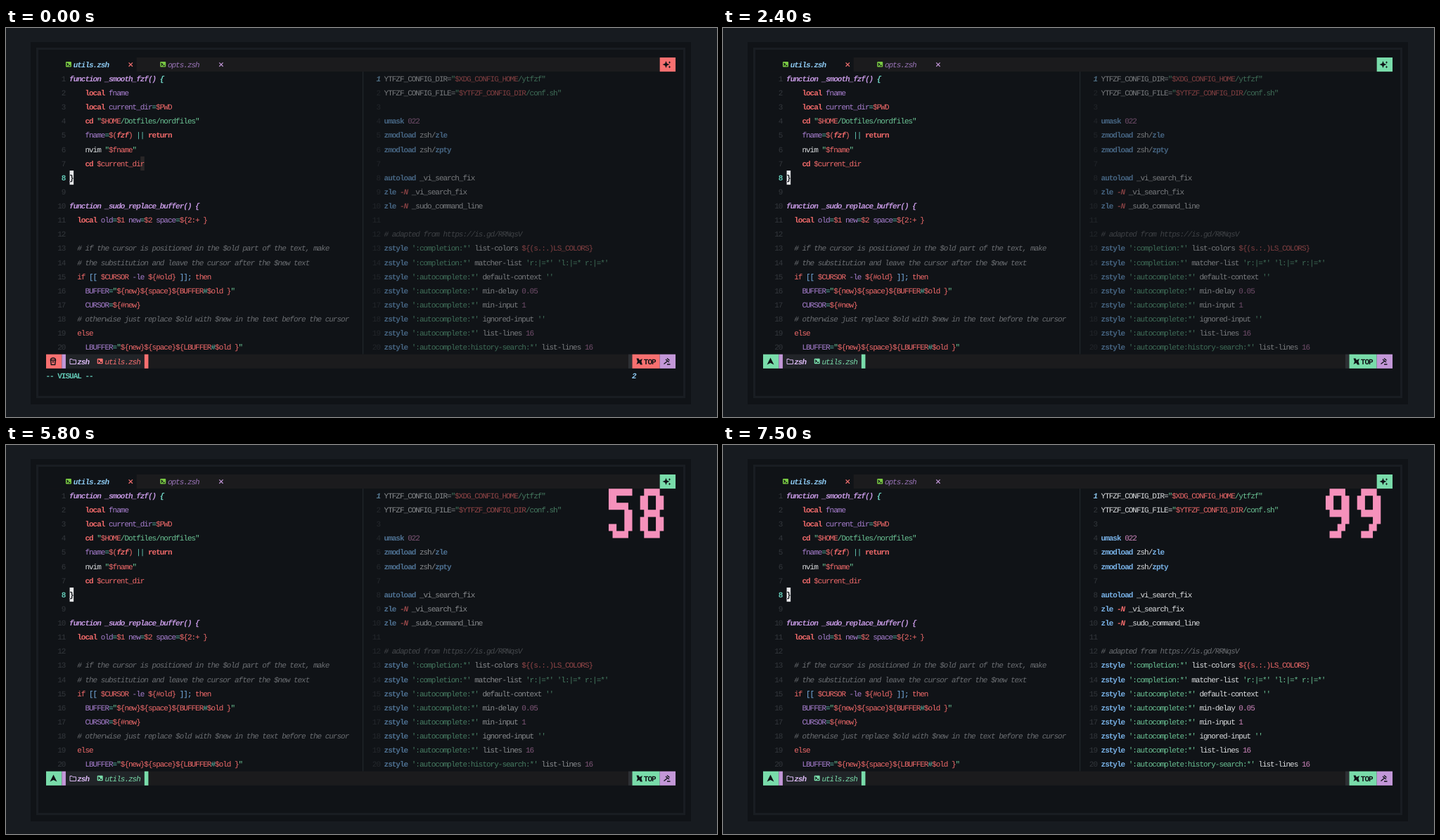
Animation, 1011 px wide and 554 px high, one loop 8 s. Source, as an HTML page:

```html
<!DOCTYPE html>
<html lang="en">
<head>
<meta charset="utf-8">
<title>Dimmed split panes</title>
<style>
html, body { margin: 0; width: 100%; height: 100%; overflow: hidden; background: #171b20; }
svg { display: block; width: 100vw; height: 100vh; --mode: #79dcaa; }
svg[data-mode=visual] { --mode: #f87070; }
text { font: 11px "Liberation Mono", "DejaVu Sans Mono", monospace; text-anchor: middle; text-rendering: geometricPrecision; }
.w { fill: #dfe1e3; }
.r, .R, .i { fill: #f06a6a; }
.m, .x { fill: #c397e0; }
.p { fill: #a87fd0; }
.t, .T { fill: #63c9b6; }
.g { fill: #6cc596; }
.c { fill: #6b6e72; }
.b, .B { fill: #7ab4ea; }
.k { fill: #cf86bd; }
.n { fill: #33373c; }
.d { fill: #101317; }
.z { fill: #d9b8f2; }
.l { fill: #8cc8f0; }
.q { fill: #9a74b8; }
.o { fill: var(--mode); }
.R, .i, .m, .x, .T, .B, .d, .z, .l { font-weight: bold; }
.i, .m, .x, .c, .z, .l, .q, .o { font-style: italic; }
[data-win=left] .x { fill: #70d5c5; }
.mode { fill: var(--mode); }
.line { fill: none; stroke: #101317; stroke-width: 1.4; }
[data-show] { display: none; }
[data-mode=visual] [data-show=visual],
[data-mode=normal] [data-show=normal],
[data-tab=left] [data-show=tab-left],
[data-tab=right] [data-show=tab-right],
[data-win=left] [data-show=file-left],
[data-win=right] [data-show=file-right],
[data-cursor=left] [data-show=cursor-left],
[data-cursor=right] [data-show=cursor-right],
[data-cursor=cmd] [data-show=cursor-cmd] { display: inline; }
</style>
</head>
<body>
<svg id="stage" viewBox="0 0 1011 554" preserveAspectRatio="none"></svg>

<script type="text/plain" id="utils">
~mfunction _smooth_fzf() ~x{
    ~Rlocal~p fname
    ~Rlocal~p current_dir~t=~r$PWD
    ~Rcd~g "~r$HOME~g/Dotfiles/nordfiles"
    ~pfname~t=~r$(~ifzf~r)~t ||~R return
    ~wnvim~g "~r$fname~g"
    ~Rcd~r $current_dir
~m}

~mfunction _sudo_replace_buffer() {
  ~Rlocal~p old~t=~r$1~p new~t=~r$2~p space~t=~r${2:+ }

  ~c# if the cursor is positioned in the $old part of the text, make
  ~c# the substitution and leave the cursor after the $new text
  ~rif~b [[~r $CURSOR~p -le~r ${#old}~b ]];~r then
    ~pBUFFER~t=~g"~r${new}${space}${BUFFER~t#~r$old }~g"
    ~pCURSOR~t=~r${#new}
  ~c# otherwise just replace $old with $new in the text before the cursor
  ~relse
    ~pLBUFFER~t=~g"~r${new}${space}${LBUFFER~t#~r$old }~g"
</script>
<script type="text/plain" id="opts">
~wYTFZF_CONFIG_DIR=~g"~r$XDG_CONFIG_HOME~g/ytfzf"
~wYTFZF_CONFIG_FILE=~g"~r$YTFZF_CONFIG_DIR~g/conf.sh"

~Bumask~k 022
~Bzmodload~w zsh/~Bzle
~Bzmodload~w zsh/~Bzpty

~Bautoload~w _vi_search_fix
~Bzle~i -N~w _vi_search_fix
~Bzle~i -N~w _sudo_command_line

~c# adapted from https://is.gd/RRNqsV
~Bzstyle~g ':completion:*'~w list-colors~r ${(s.:.)LS_COLORS}
~Bzstyle~g ':completion:*'~w matcher-list~g 'r:|=*' 'l:|=* r:|=*'
~Bzstyle~g ':autocomplete:*'~w default-context~g ''
~Bzstyle~g ':autocomplete:*'~w min-delay~k 0.05
~Bzstyle~g ':autocomplete:*'~w min-input~k 1
~Bzstyle~g ':autocomplete:*'~w ignored-input~g ''
~Bzstyle~g ':autocomplete:*'~w list-lines~k 16
~Bzstyle~g ':autocomplete:history-search:*'~w list-lines~k 16
</script>

<script>
const CELL = 5.594, ROW = 20.13, LOOP = 8000;
const colX = c => 57 + c * CELL;
const rowY = r => 42 + r * ROW;
const stage = document.getElementById("stage");

function add(parent, tag, attrs = {}) {
  const el = document.createElementNS("http://www.w3.org/2000/svg", tag);
  for (const key in attrs) el.setAttribute(key, attrs[key]);
  return parent.appendChild(el);
}
const group = (parent, show) => add(parent, "g", show ? { "data-show": show } : {});
const rect = (parent, x, y, width, height, attrs) => add(parent, "rect", { x, y, width, height, ...attrs });
const path = (parent, d, attrs) => add(parent, "path", { d, ...attrs });
const cells = (parent, from, to, row, attrs) =>
  rect(parent, colX(from), rowY(row), (to - from) * CELL, ROW, attrs);

// Every character sits in the middle of its own terminal cell.
function write(parent, col, row, style, string) {
  const xs = [...string].map((_, i) => colX(col + i + 0.5).toFixed(2));
  const el = add(parent, "text", { x: xs.join(" "), y: rowY(row) + 13.8, class: style });
  el.textContent = string.replace(/ /g, "\u00a0");
  return el;
}

function pane(sourceId, col, current, currentStyle) {
  const g = group(stage);
  const lines = document.getElementById(sourceId).textContent.slice(1).split("\n").slice(0, 20);
  lines.forEach((line, i) => {
    const label = String(i + 1);
    write(g, col - 1 - label.length, i + 1, i + 1 === current ? currentStyle : "n", label);
    const [indent, ...tokens] = line.split("~");
    let at = col + indent.length;
    for (const token of tokens) {
      write(g, at, i + 1, token[0], token.slice(1));
      at += token.length - 1;
    }
  });
  return g;
}

function terminalIcon(parent, col, row, attrs) {
  const x = colX(col), y = rowY(row) + 6;
  rect(parent, x, y, 8, 7.4, { rx: 1, ...attrs });
  path(parent, `M${x + 1.5} ${y + 2}l1.8 1.7-1.8 1.7M${x + 4.2} ${y + 5.5}h2.3`, { class: "line", "stroke-width": 1 });
}

function cursor(show, col, row, char) {
  const g = group(stage, show);
  cells(g, col, col + 1, row, { fill: "#e6e7e9" });
  if (char) write(g, col, row, "d", char);
}

// Window frame
rect(stage, 0, 0, 1011, 554, { fill: "#171b20" });
rect(stage, 35, 20, 939, 516, { fill: "#101317" });
rect(stage, 44.5, 29.5, 920, 496, { fill: "none", stroke: "#191d22", "stroke-width": 3 });

// Tab line
function tabs(active, from, to) {
  const g = group(stage, "tab-" + active);
  cells(g, 0, 156, 0, { fill: "#1b1b1d" });
  cells(g, from, to, 0, { fill: "#101317" });
  [["left", 5, "utils.zsh", 21], ["right", 29, "opts.zsh", 44]].forEach(([side, col, name, close]) => {
    const on = side === active;
    terminalIcon(g, col, 0, { fill: "#79c843" });
    write(g, col + 2, 0, on ? "l" : "q", name);
    const x = colX(close + 0.5), y = rowY(0.5);
    path(g, `M${x - 2.7} ${y - 2.7}l5.4 5.4m0-5.4l-5.4 5.4`,
      { fill: "none", stroke: on ? "#f87070" : "#c397d8", "stroke-width": 1.2 });
  });
}
tabs("left", 0, 23);
tabs("right", 24, 46);
cells(stage, 156, 160, 0, { class: "mode" });
path(stage, "M938.5 47l1.4 3.6 3.6 1.4-3.6 1.4-1.4 3.6-1.4-3.6-3.6-1.4 3.6-1.4zM943.5 47l.6 1.4 1.4.6-1.4.6-.6 1.4-.6-1.4-1.4-.6 1.4-.6zM943.5 53.5l.6 1.4 1.4.6-1.4.6-.6 1.4-.6-1.4-1.4-.6 1.4-.6z", { fill: "#101317" });

// Split panes
const selection = group(stage, "visual");
cells(selection, 24, 25, 7, { fill: "#2a2627" });
const leftPane = pane("utils", 6, 8, "T");
const rightPane = pane("opts", 86, 1, "l");
rect(stage, 507, rowY(1), 1.2, ROW * 20, { fill: "#22262b" });
cursor("cursor-left", 6, 8, "}");
cursor("cursor-right", 86, 1, "Y");

// Status line
cells(stage, 0, 160, 21, { fill: "#1b1b1d" });
cells(stage, 0, 4, 21, { class: "mode" });
cells(stage, 4, 5, 21, { fill: "#c397d8" });
path(group(stage, "normal"), "M67.5 469.5l5 10-5-2.6-5 2.6z", { fill: "#101317" });
path(group(stage, "visual"), "M63.5 473q0-3 3.5-3t3.5 3zM63.5 473h7l-.8 6.5h-5.4zM65.5 475.5h3", { class: "line" });
[["left", "utils.zsh", 25], ["right", "opts.zsh", 24]].forEach(([side, name, bar]) => {
  const g = group(stage, "file-" + side);
  cells(g, 5, bar, 21, { fill: "#212428" });
  cells(g, bar, bar + 1, 21, { class: "mode" });
  terminalIcon(g, 13, 21, { class: "mode" });
  write(g, 15, 21, "o", name);
});
path(stage, "M91 471.5h3l1 1.3h4.5v5.7h-8.5z", { fill: "none", stroke: "#d9b8f2" });
write(stage, 8, 21, "z", "zsh");
cells(stage, 148, 149, 21, { fill: "#2d3034" });
cells(stage, 149, 156, 21, { class: "mode" });
path(stage, "M896.5 470.5h3l1.3 2.6 4.2-2.1-1.5 4 1.5 4.5h-3l-1.5-2.5-4 2 1.5-4z", { fill: "#101317" });
write(stage, 152, 21, "d", "TOP");
cells(stage, 156, 160, 21, { fill: "#c397d8" });
path(stage, "M938 472l5 4M935.5 478.5l5-4M940 470.5l3.5 3M940 479h4.5", { class: "line" });

// Command line
write(group(stage, "visual"), 0, 22, "T", "-- VISUAL --");
write(group(stage, "cursor-cmd"), 0, 22, "w", ":");
cursor("cursor-cmd", 1, 22);
const pending = ["2", "^W"].map(keys => [keys, write(stage, 149, 22, "l", keys)]);

// Block digits: one terminal cell wide, half a row high
const DIGITS = [
  ".#####. ##...## ##..### ##.#### ####.## ###..## .#####.",
  "..## .### ..## ..## ..## ..## ######",
  ".#### ##..## ....## ..### .## ##..## ######",
  ".#### ##..## ....## ..### ....## ##..## .####",
  "...### ..#### .##.## ##..## ####### ....## ...####",
  "###### ## ##### ....## ....## ##..## .####",
  "..### .## ## ##### ##..## ##..## .####",
  "###### ##..## ....## ...## ..## ..## ..##",
  ".#### ##..## ##..## .#### ##..## ##..## .####",
  ".#### ##..## ##..## .##### ....## ...## .###"
];
const counter = path(stage, "", { fill: "#f591bb" });

function digitPath(digit, col) {
  return DIGITS[digit].split(" ").map((bits, r) =>
    [...bits.matchAll(/#+/g)].map(run =>
      `M${colX(col + run.index)} ${rowY(1 + r / 2)}h${run[0].length * CELL}v${ROW / 2}h${-run[0].length * CELL}z`
    ).join("")).join("");
}

const SCENES = [
  { at: 0, mode: "visual", win: "left", tab: "left", cursor: "left", keys: "2" },
  { at: 500, keys: "^W" },
  { at: 800, mode: "normal", win: "right", tab: "right", cursor: "right", keys: "" },
  { at: 1600, keys: "^W" },
  { at: 2000, win: "left", cursor: "cmd", keys: "" },
  { at: 2400, tab: "left", cursor: "left" }
];
const PRESSES = [3900, 4300, 4400, 4600, 4800, 5100];

function brightness(t) {
  if (t >= 5800) return Math.min(99, Math.floor(58 + 2.5 * Math.floor((t - 5800) / 100)));
  return 50 + PRESSES.filter(at => t >= at).length;
}

function render(t) {
  const scene = Object.assign({}, ...SCENES.filter(s => t >= s.at));
  for (const key of ["mode", "win", "tab", "cursor"]) stage.dataset[key] = scene[key];
  for (const [keys, el] of pending) el.style.display = keys === scene.keys ? "" : "none";

  const level = brightness(t);
  leftPane.style.opacity = scene.win === "left" ? 1 : 0.5;
  rightPane.style.opacity = scene.win === "right" ? 1 : level / 100;
  counter.setAttribute("d", level > 51
    ? digitPath(Math.floor(level / 10), 143) + digitPath(level % 10, 151) : "");
}

const start = performance.now();
function tick() {
  render((performance.now() - start) % LOOP);
  requestAnimationFrame(tick);
}
tick();
</script>
</body>
</html>
```
